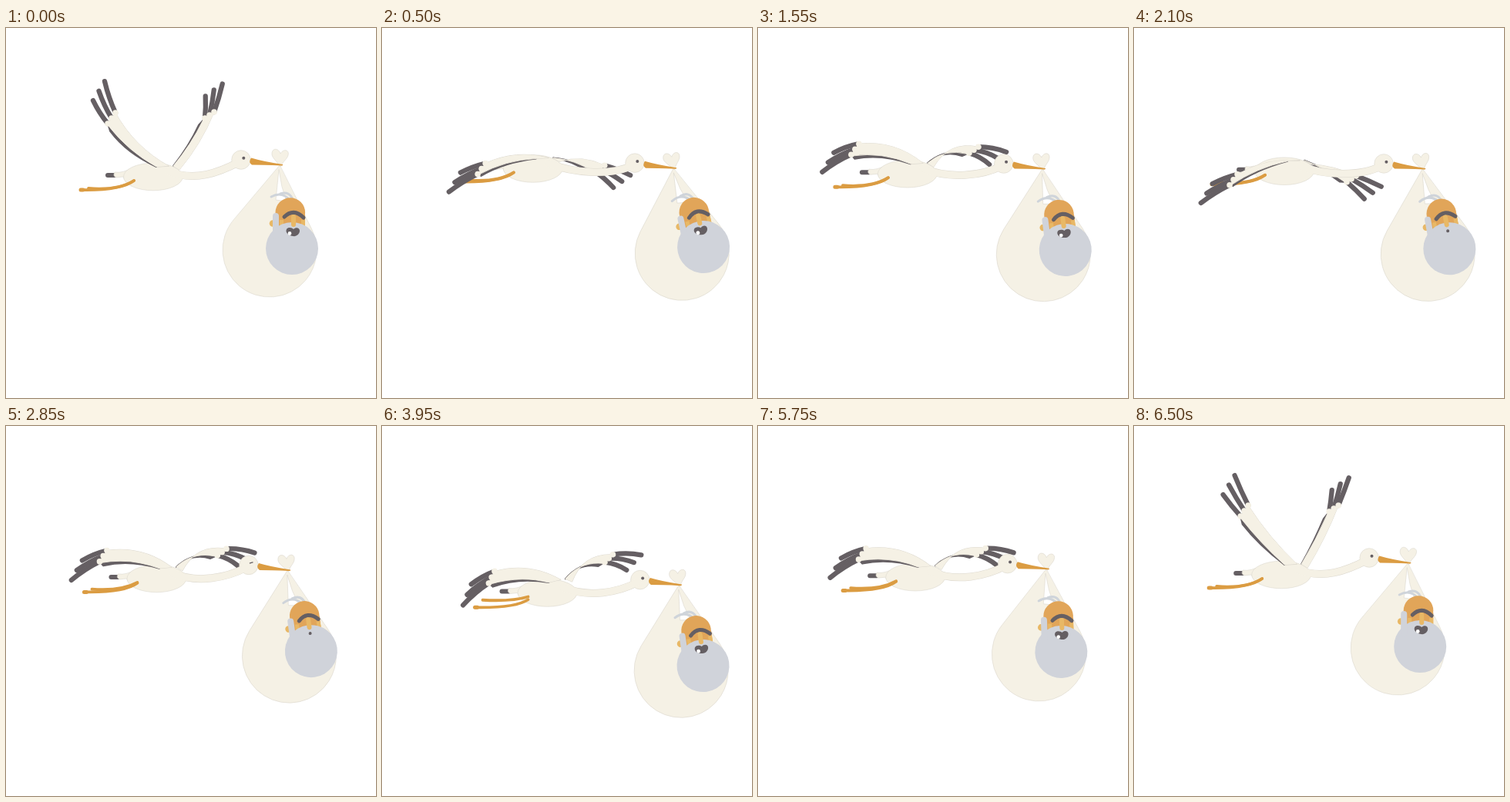
Recreate the animation shown at these times as an HTML page with a canvas. Size 480 by 480 pixels, loop 6550 ms.

```html
<!DOCTYPE html>
<html lang="en">
<head>
<meta charset="utf-8">
<title>Stork delivery</title>
<style>
html, body { margin: 0; width: 100%; height: 100%; overflow: hidden; background: #fff; }
canvas { display: block; width: 480px; height: 480px; }
</style>
</head>
<body>
<canvas id="stage" width="480" height="480"></canvas>
<script>
const LOOP = 6550, STEP = 50, FLAP = 900, GLIDE = 2100;
const CREAM = '#f5f1e5', EDGE = '#dcd8ce', DARK = '#655f63', ORANGE = '#db9c42',
      SKIN = '#e1a559', LIGHT = '#e8b866', GREY = '#d0d3da';
const g = document.getElementById('stage').getContext('2d');
g.lineCap = g.lineJoin = 'round';

// Each pose: hand x, y relative to the body, feather direction in degrees, bow of the arm
const near = {
  side: 1, roots: [[20, -14], [4, -13]], bases: [10, -14], tips: [15, -25], length: 39,
  up: [-48, -83, -121, 6], top: [-54, -76, -115, 14], fall: [-71, -48, -116, 22],
  low: [-66, 11, -207, -13], glide: [-68, -32, -206, -18]
};
const far = {
  side: -1, roots: [[34, -9], [26, -14]], bases: [12, -8], tips: [22, -16], length: 33,
  up: [68, -86, -75, 4], top: [73, -80, -80, 7], fall: [91, -51, -82, 16],
  low: [87, 10, 33, -6], glide: [86, -31, 19, -23]
};

const beats = [];
for (let t = 0; t <= GLIDE; t += FLAP)
  beats.push([t, 'top'], [t + 100, 'fall'], [t + 300, 'low'], [t + 400, 'low'], [t + 650, 'glide']);
beats.push([6100, 'glide'], [6500, 'up'], [LOOP, 'top']);
for (const w of [near, far]) w.track = beats.map(([t, name]) => [t, w[name]]);

// Neck reach and bundle angle while gliding
const reach = t => {
  const s = (1 - Math.cos((t + 5) / FLAP * 2 * Math.PI)) / 2;
  return s * (1 + 3 * s - 2 * s * s) / 2;
};
const SWING = -12.8;
const poise = [
  [GLIDE, [reach(GLIDE), SWING * reach(GLIDE)]],
  [2850, [.3, -8]], [4350, [.35, -8.5]], [5750, [.3, -1.9]], [6500, [0, 0]], [LOOP, [0, 0]]
];
const hump = (t, from, to) =>
  t > from && t < to ? Math.sin((t - from) / (to - from) * Math.PI) ** 1.5 : 0;

function flight(t) {
  const c = reach(t);
  const [stretch, angle] = t <= GLIDE ? [c, SWING * c] : at(poise, t);
  const sink = hump(t, 2400, 6100);
  const bx = 191 + 5 * stretch + 26 * hump(t, 2550, LOOP);
  const by = 193 - 11 * stretch ** 2 + 26 * sink;
  return { bx, by, hx: bx + 114 + 18.5 * stretch, hy: by - 22 + 15 * stretch, angle, sink };
}

// Monotone cubic interpolation of whole value lists
function at(keys, t) {
  let i = 0;
  while (i < keys.length - 2 && t >= keys[i + 1][0]) i++;
  const [t0, a] = keys[i], [t1, b] = keys[i + 1], h = t1 - t0, u = (t - t0) / h;
  const slope = (n, k) => n < 0 || n > keys.length - 2 ? 0
    : (keys[n + 1][1][k] - keys[n][1][k]) / (keys[n + 1][0] - keys[n][0]);
  const tangent = (n, k) => {
    const p = slope(n - 1, k), q = slope(n, k);
    return p * q > 0 ? 2 * p * q / (p + q) : 0;
  };
  return a.map((v, k) => {
    const d = b[k] - v, m0 = tangent(i, k) * h, m1 = tangent(i + 1, k) * h;
    return v + u * (m0 + u * (3 * d - 2 * m0 - m1 + u * (m0 + m1 - 2 * d)));
  });
}

function fill(color, path, edge) {
  g.fillStyle = color;
  g.fill(path);
  if (edge) stroke(edge, .6, path);
}
function stroke(color, width, path) {
  g.strokeStyle = color;
  g.lineWidth = width;
  g.stroke(path);
}
function oval(x, y, rx, ry = rx) {
  const p = new Path2D();
  p.ellipse(x, y, rx, ry, 0, 0, 2 * Math.PI);
  return p;
}
function place(x, y, degrees, paint) {
  g.save();
  g.translate(x, y);
  g.rotate(degrees * Math.PI / 180);
  paint();
  g.restore();
}

const add = (p, q, k = 1) => [p[0] + q[0] * k, p[1] + q[1] * k];
const mix = (p, q, u = .5) => [p[0] + (q[0] - p[0]) * u, p[1] + (q[1] - p[1]) * u];
// Control point of a curve from p to q, bowed sideways
function bowed(p, q, bow) {
  const dx = q[0] - p[0], dy = q[1] - p[1];
  return add(mix(p, q), [dy, -dx], bow / Math.hypot(dx, dy));
}

function wing(w, t) {
  const [x, y, degrees, arch] = at(w.track, t);
  const hand = [x, y], dir = degrees * Math.PI / 180, bow = arch * w.side;
  const [root1, root2] = w.roots;
  const tip = add(hand, [Math.cos(dir), Math.sin(dir)], w.length);
  const ranks = [.5, 0, -.5], bases = ranks.map(k => add(hand, w.bases, k));

  ranks.forEach((k, i) => {
    const end = add(tip, w.tips, k), p = new Path2D();
    p.moveTo(...bases[i]);
    p.quadraticCurveTo(...bowed(bases[i], end, bow * .15), ...end);
    stroke(DARK, 6.3, p);
  });

  const last = bases[2];
  const under = mix(add(last, w.bases, -.35), root2, .1);
  const start = mix(last, under, .3);
  const inner = bowed(root2, start, bow * .6);
  const strip = new Path2D();
  strip.moveTo(...under);
  strip.quadraticCurveTo(...add(inner, w.bases, -.2), ...root2);
  strip.quadraticCurveTo(...inner, ...start);
  strip.closePath();
  fill(DARK, strip);
  stroke(DARK, 2, strip);

  const p = new Path2D();
  p.moveTo(...root1);
  p.quadraticCurveTo(...bowed(root1, bases[0], bow), ...bases[0]);
  p.lineTo(...bases[1]);
  p.lineTo(...last);
  p.lineTo(...start);
  p.quadraticCurveTo(...inner, ...root2);
  p.closePath();
  stroke(EDGE, 1, p);
  bases.forEach(b => fill(CREAM, oval(...b, 3.8)));
  fill(CREAM, p);
}

function legs(spread) {
  const foot = 17 + 2 * spread;
  stroke(ORANGE, 3.8, new Path2D(`M-25 5Q-46 ${18 - 7 * spread} -84 ${15 - 6 * spread}`));
  stroke(ORANGE, 3.8, new Path2D(`M-25 ${5 + 4 * spread}Q-42 ${18 + 2 * spread} -94 ${foot}`));
  stroke(ORANGE, 5, new Path2D(`M-94 ${foot}h3`));
}

function bundle(mouthOpen) {
  const cx = -13, cy = 110, r = 61;
  const axis = Math.atan2(cy, cx), half = Math.acos(r / Math.hypot(cx, cy));
  const cloth = new Path2D();
  cloth.moveTo(0, 0);
  cloth.arc(cx, cy, r, axis + Math.PI - half, axis + Math.PI + half, true);
  cloth.closePath();
  fill(CREAM, cloth, EDGE);
  fill('#fff', new Path2D('M-1 6L-5 45L9 47L3 28Z'), EDGE);
  fill(CREAM, new Path2D('M0 1C-4-6-11-10-10-16C-9-23-1-22 1-15C5-22 13-20 11-13C10-8 4-5 2 1Z'), EDGE);

  stroke('#cfd4da', 3, new Path2D('M-11 41Q3 33 14 46M1 37Q13 33 17 45'));
  fill(LIGHT, oval(-9, 75.5, 4.3));
  fill(SKIN, oval(13.8, 61.5, 19.3));
  fill(SKIN, new Path2D('M-3 64h36v18h-36z'));
  fill(LIGHT, new Path2D('M0 71h5v10h-5zM28 71h5v10h-5z'));
  stroke(DARK, 5, new Path2D('M6 67Q18 55 31 68'));
  fill(GREY, oval(16, 108, 34));
  stroke(GREY, 8, new Path2D('M-5 66V92'));
  stroke(LIGHT, 6, new Path2D('M18 67V77'));
  if (mouthOpen) {
    fill(DARK, new Path2D('M17 92C11 91 7 87 9 83C11 80 16 81 18 83C21 80 26 81 26 85C26 89 22 93 17 92Z'));
    fill('#fff', oval(13, 88.5, 2.4));
  } else {
    fill(DARK, oval(18, 85, 2));
  }
}

function draw(t) {
  const { bx, by, hx, hy, angle, sink } = flight(t);
  const tilt = -10 * sink;
  g.clearRect(0, 0, 480, 480);

  place(bx, by, tilt, () => wing(far, t));
  place(bx, by, 0, () => {
    stroke(DARK, 6, new Path2D('M-59-2H-50'));
    fill(CREAM, new Path2D('M-24-13Q-40-4-50-6Q-53-1-48 1L-39 0Q-36 8-28 12Z'), EDGE);
  });

  const neck = new Path2D();
  neck.moveTo(bx + 20, by - 7);
  neck.bezierCurveTo(bx + 54, by + 7, hx - 28, hy + 16, hx - 3, hy + 3);
  stroke(EDGE, 10, neck);
  fill(CREAM, oval(bx, by, 38.5, 17.8), EDGE);
  fill(CREAM, oval(hx, hy, 12.3), EDGE);
  stroke(CREAM, 9, neck);

  place(hx, hy, 0, () => {
    if (t >= 2800 && t <= 2900) stroke(DARK, 1.4, new Path2D('M1.5-2.5L5-3.5'));
    else fill(DARK, oval(3.3, -2.2, 2));
  });
  place(bx, by, 0, () => legs(sink));
  place(bx, by, tilt, () => wing(near, t));
  place(hx + 50, hy + 7, angle, () => bundle(t < 1950 || t > 3200));
  place(hx, hy, 0, () => fill(ORANGE, new Path2D('M13-2.5Q28 2 54 6Q55 7.3 52 7.6Q28 6.5 14 6.5Q9 3 13-2.5Z')));
}

const begin = performance.now();
function tick(now) {
  const t = Math.max(0, now - begin) % LOOP;
  draw(Math.floor(t / STEP) * STEP);
  requestAnimationFrame(tick);
}
draw(0);
requestAnimationFrame(tick);
</script>
</body>
</html>
```
